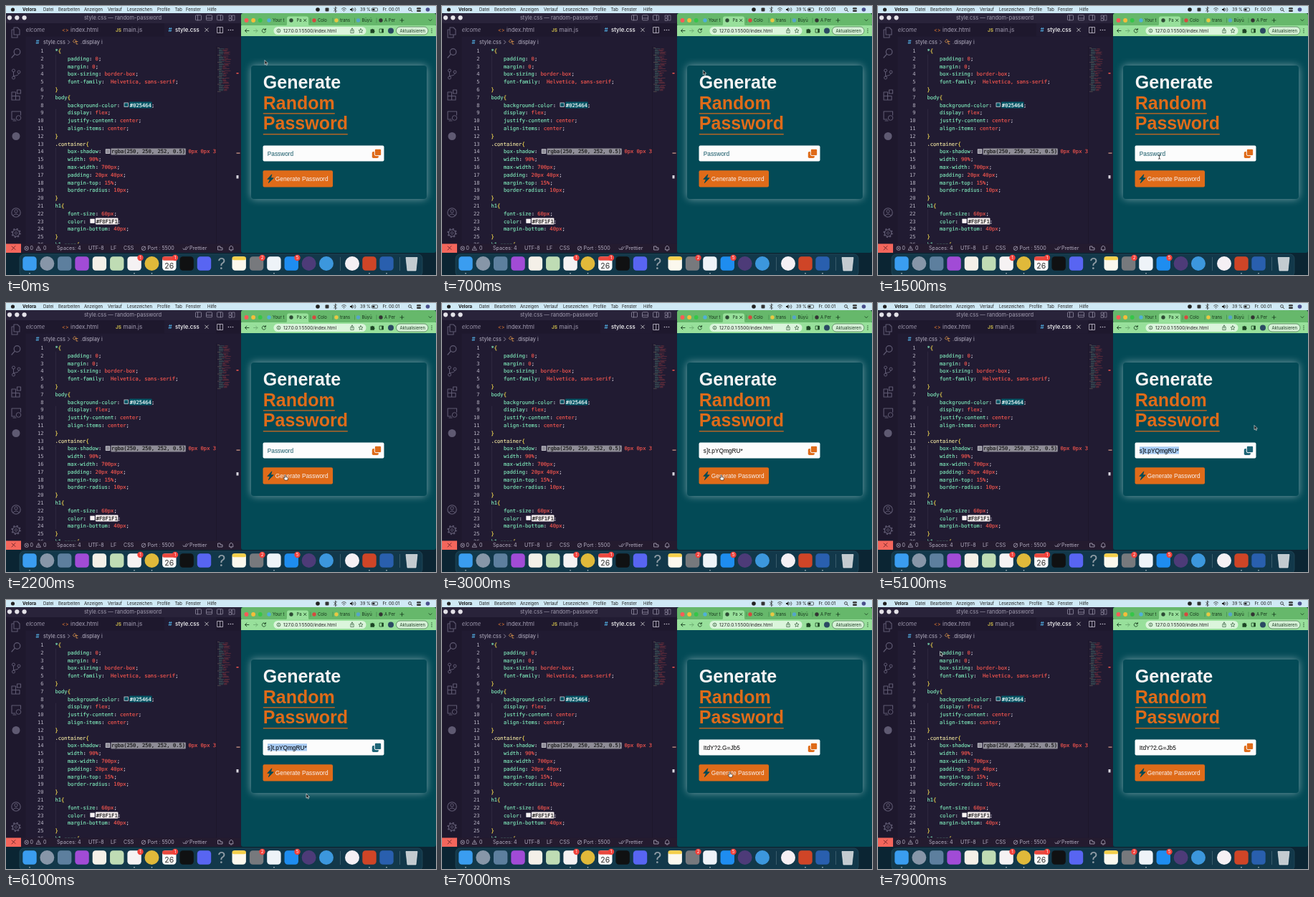
Recreate the animation shown at these times as an HTML page. Size 600 px wide and 375 px high, loop 8000 ms.

```html
<!DOCTYPE html>
<html lang="de">
<head>
<meta charset="utf-8">
<title>Random password</title>
<style>
  html, body { margin: 0; width: 100%; height: 100%; overflow: hidden; background: #0b2533; }
  svg { display: block; width: 100vw; height: 100vh; }
  text { white-space: pre; font-family: Inter, sans-serif; }
  .mono { font-family: "DejaVu Sans Mono", monospace; }
  .page { font-family: "Liberation Sans", sans-serif; }
</style>
</head>
<body>
<svg id="stage" viewBox="0 0 600 375">
  <defs>
    <filter id="glow" x="-20%" y="-20%" width="140%" height="140%"><feGaussianBlur stdDeviation="5.5"/></filter>
    <clipPath id="editorClip"><rect x="27" y="56" width="266" height="275.5"/></clipPath>
  </defs>
</svg>
<script>
const stage = document.getElementById('stage');
const ORANGE = '#df6b19', TEAL = '#034a56', EDITOR = '#211b32', SIDE = '#1e182d';
const MINT = '#7fe8ba', RED = '#f7574f', CREAM = '#f1e6a2', YELLOW = '#f2d94e', DIM = '#5f5a72';

function add(tag, attrs, parent = stage) {
  const el = document.createElementNS('http://www.w3.org/2000/svg', tag);
  for (const k in attrs) el.setAttribute(k, attrs[k]);
  parent.appendChild(el);
  return el;
}
const rect = (x, y, width, height, fill, rx = 0, extra = {}, parent) =>
  add('rect', { x, y, width, height, fill, rx, ...extra }, parent);
const dot = (cx, cy, r, fill, extra = {}) => add('circle', { cx, cy, r, fill, ...extra });
const ring = (cx, cy, r, stroke, width = 1) => dot(cx, cy, r, 'none', { stroke, 'stroke-width': width });
const line = (d, stroke, width = 1, extra = {}, parent) =>
  add('path', { d, stroke, 'stroke-width': width, fill: 'none', 'stroke-linecap': 'round', 'stroke-linejoin': 'round', ...extra }, parent);
const shape = (d, fill, extra = {}, parent) => add('path', { d, fill, ...extra }, parent);
function text(str, x, y, size, fill, extra = {}, parent) {
  const el = add('text', { x, y, 'font-size': size, fill, ...extra }, parent);
  el.textContent = str;
  return el;
}
const trafficLights = (x, y, step, r, colors) =>
  colors.forEach((c, i) => dot(x + i * step, y, r, c));

function drawMenuBar() {
  rect(0, 0, 600, 10, '#cfe9f5');
  dot(9.5, 5, 2.6, '#222');
  text('Velora', 23, 7, 6.1, '#111', { 'font-weight': 700 });
  [['Datei', 52], ['Bearbeiten', 73], ['Anzeigen', 109], ['Verlauf', 142], ['Lesezeichen', 169],
   ['Profile', 211], ['Tab', 235.5], ['Fenster', 251], ['Hilfe', 281]]
    .forEach(([s, x]) => text(s, x, 7, 5.9, '#1b1b1b'));
  dot(435, 5, 2.8, '#222');
  rect(445.5, 2.5, 5, 5, '#333', 1);
  line('M457.5 3l4 4l-2 2V1l2 2l-4 4', '#222', .7);
  line('M468.5 4q3-3 6 0M469.8 5.7q1.7-1.7 3.4 0M471.5 7.4v.1', '#222', .8);
  shape('M480 4h1.5l2-2v6l-2-2h-1.5z', '#222');
  line('M485 3.5q1.5 1.5 0 3M487 2.5q2.4 2.5 0 5', '#222', .7);
  text('39 %', 494, 7, 5.9, '#1b1b1b');
  rect(510.5, 2.8, 8, 4.4, 'none', 1, { stroke: '#333', 'stroke-width': .7 });
  rect(511.4, 3.7, 3, 2.6, '#222');
  text('Fr. 00:01', 525.5, 7, 5.9, '#1b1b1b');
  ring(563.5, 4.5, 1.9, '#222', .8);
  line('M565 6l1.8 1.8', '#222', .8);
  rect(573, 2.2, 6, 2.4, '#333', 1.2);
  rect(573, 5.5, 6, 2.4, '#333', 1.2);
  dot(588.5, 5, 2.8, '#4a4f8c');
}

function drawActivityBar() {
  rect(0, 24, 27.5, 308, SIDE);
  line('M11 30h5l3 3v7h-8zM11 33h-3v11h8v-4', DIM, 1.1);
  ring(15.5, 64, 4.3, DIM, 1.2);
  line('M12.3 67.2l-4.3 4.8', DIM, 1.2);
  [[10.5, 90], [10.5, 100], [18, 92]].forEach(([x, y]) => ring(x, y, 2, DIM));
  line('M10.5 92v6M18 94q0 3-7 3.5', DIM);
  line('M8 120h5.5v11H8zM8 125.5h11v5.5h-5.5M15.5 117h5v5h-5z', DIM, 1.1);
  line('M13 158H8v-11h12.5v5M10 160h4', DIM, 1.1);
  ring(17.5, 156, 3.3, DIM);
  dot(14, 181.5, 5.5, DIM);
  ring(14, 288, 6.2, DIM, 1.1);
  ring(14, 286, 2.2, DIM);
  line('M9.8 292.3q4.2-5 8.4 0', DIM);
  ring(14, 316.5, 4.6, DIM, 1.2);
  ring(14, 316.5, 1.7, DIM);
  dot(14, 316.5, 5.9, 'none', { stroke: DIM, 'stroke-width': 1.6, 'stroke-dasharray': '2.1 2.53' });
}

function drawEditorChrome() {
  rect(0, 10, 328, 334, EDITOR, 3);
  rect(0, 10, 328, 14, '#29233a', 3);
  trafficLights(5, 16.3, 10.3, 3.1, ['#e4e2e8', '#e4e2e8', '#e4e2e8']);
  text('style.css — random-password', 163, 19, 7.5, '#a29db0', { 'text-anchor': 'middle' });
  const icon = '#8f899f';
  [264.5, 279.5, 294.5].forEach((x, i) => {
    rect(x, 12.8, 8, 7, 'none', .8, { stroke: icon, 'stroke-width': .8 });
    line([`M${x + 3} 13v7`, `M${x} 17h8`, `M${x + 5} 13v7`][i], icon, .8);
  });
  line('M311.5 13h3v3h-3zM311.5 17.5h3v3h-3zM316 13h3v7h-3z', icon, .7);

  rect(27.5, 24, 300.5, 18.5, SIDE);
  rect(221, 24, 72, 18.5, EDITOR);
  const tabY = 36.2;
  text('elcome', 27.8, tabY, 7.7, '#9b95aa', { 'font-style': 'italic' });
  text('<>', 78, tabY, 7.2, '#e37933');
  text('index.html', 90, tabY, 8, '#a49eb3');
  text('JS', 153, tabY - .2, 6.4, '#d3c04b', { 'font-weight': 700 });
  text('main.js', 163.5, tabY, 8, '#a49eb3');
  text('#', 226.5, tabY, 8, '#4d9fd0', { 'font-weight': 700 });
  text('style.css', 236, tabY, 7.9, '#fff', { 'font-weight': 500 });
  line('M277.7 31l4.6 4.6M282.3 31l-4.6 4.6', '#ddd', .8);
  line('M295 29.5h7.5v8H295zM298.7 29.5v8', '#c9c4d2', .8);
  [310.5, 313.5, 316.5].forEach(x => dot(x, 33.5, .8, '#c9c4d2'));

  text('#', 41.5, 53, 7.7, '#4d9fd0', { 'font-weight': 700 });
  text('style.css', 52, 53, 7.4, '#b9b4c6');
  line('M86.5 48l2.3 2.4l-2.3 2.4', '#aaa4b8', .8);
  line('M93.5 49l2.5-2.5l2 2l-2.5 2.5zM97 49.5h3M98 49.5v3.5h2', '#e39a4c', .8);
  text('.display i', 104, 53, 7.4, '#b9b4c6');
}

const SOURCE = [
  '*{', 'padding: 0;', 'margin: 0;', 'box-sizing: border-box;', 'font-family:  Helvetica, sans-serif;', '}',
  'body{', 'background-color: ~#025464~;', 'display: flex;', 'justify-content: center;', 'align-items: center;', '}',
  '.container{', 'box-shadow: ~rgba(250, 250, 252, 0.5)~ 0px 0px 3', 'width: 90%;', 'max-width: 700px;',
  'padding: 20px 40px;', 'margin-top: 15%;', 'border-radius: 10px;', '}',
  'h1{', 'font-size: 60px;', 'color: ~#F8F1F1~;', 'margin-bottom: 40px;', '}', 'h1 span{'
];
const SWATCH = { '#025464': ['#025464', '#fff'], '#F8F1F1': ['#f8f1f1', '#111'] };

function drawCode() {
  const size = 7.13, cw = size * .602, code = add('g', { clipPath: '', 'clip-path': 'url(#editorClip)' });
  const put = (s, x, y, fill) =>
    text(s, x, y, size, fill, { class: 'mono', stroke: fill, 'stroke-width': .15 }, code);
  line('M69.5 68v42M69.5 144v42M69.5 198v75M69.5 284v31', '#3d364d', .5, {}, code);
  SOURCE.forEach((src, i) => {
    const y = 65 + i * 10.8;
    text(i + 1, 52.5, y, size, '#b9b5c4', { class: 'mono', 'text-anchor': 'end' }, code);
    const cut = src.indexOf(':');
    if (cut < 0) {
      const name = src.replace(/[{}]/, '');
      put(name, 68.5, y, name[0] === '.' ? CREAM : MINT);
      put(src.slice(name.length), 68.5 + name.length * cw, y, YELLOW);
      return;
    }
    put(src.slice(0, cut), 86, y, MINT);
    put(':', 86 + cut * cw, y, '#d8d3e0');
    let x = 86 + (cut + 1) * cw;
    src.slice(cut + 1).split('~').forEach((part, k) => {
      if (k === 1) {
        const [bg, ink] = SWATCH[part] || ['#8e8c96', '#111'];
        rect(x + 1.7, y - 5.6, 5.6, 5.6, bg, 0, { stroke: '#e8e8ee', 'stroke-width': .7 }, code);
        x += 9.6;
        rect(x - .7, y - 7, part.length * cw + 1.4, 9, bg, 1, {}, code);
        put(part, x, y, ink);
      } else {
        const body = part.replace(/;$/, '');
        put(body, x, y, RED);
        if (body !== part) put(';', x + body.length * cw, y, '#d8d3e0');
      }
      x += part.length * cw;
    });
  });
}

function drawMinimap() {
  rect(293, 56, .6, 275.5, '#1b1627');
  let seed = 7;
  const rnd = () => (seed = seed * 16807 % 2147483647) / 2147483647;
  for (let i = 0; i < 43; i++) {
    const y = 58 + i * 1.45, head = i % 7 === 0, x = head ? 295 : 297, w = 3 + rnd() * 5;
    rect(x, y, w, .7, head ? CREAM : MINT, 0, { opacity: .3 });
    if (!head) rect(x + w + .8, y, 2 + rnd() * 8, .7, RED, 0, { opacity: .38 });
  }
  rect(321.5, 93, 3, 1.5, RED);
  rect(321.5, 204.5, 5, 1.2, '#d9a08a');
  rect(321.5, 236, 3, 4.5, '#d8d5de');
}

function drawStatusBar() {
  rect(0, 331.5, 328, 12.5, '#241b2f');
  rect(0, 331.5, 21, 12.5, '#f4665c');
  line('M8 335l2.5 2.5l-2.5 2.5M13 334.5l-2.5 2.5l2.5 2.5', '#5a1f26', .8);
  const ink = '#b3adc0', label = (s, x) => text(s, x, 340.4, 7.1, ink);
  ring(28.7, 337.8, 2.8, ink, .7);
  line('M27.5 336.6l2.4 2.4M29.9 336.6l-2.4 2.4M45.5 335l3 5.3h-6zM45.5 337v1.5', ink, .7);
  [['0', 33.5], ['0', 52], ['Spaces: 4', 71], ['UTF-8', 115], ['LF', 146], ['CSS', 164],
   ['Port : 5500', 197.5], ['Prettier', 256]].forEach(a => label(...a));
  ring(192, 337.8, 2.8, ink, .7);
  line('M190 339.8l4-4M247 338l1.5 2l3.5-4.5M250.5 339.3l.6.7l3.4-4.5', ink, .8);
  line('M296 335h3v2h3v3h-6zM311.5 339.5q0-5 2.7-5t2.7 5zM313.5 341h1.4', ink, .8);
}

function drawBrowser() {
  const strip = '#66b86b', bar = '#98e09b';
  rect(328, 12, 272, 332, TEAL, 3);
  rect(328, 10, 272, 18, strip, 3);
  rect(328, 27, 272, 15, bar);
  trafficLights(335.5, 20, 9.6, 2.9, ['#fc5b57', '#f5bd3a', '#35c648']);
  shape('M390 27.5q2 0 2-3v-7q0-3 3-3h24q3 0 3 3v7q0 3 2 3z', bar);
  [['Your t', 364.5, '#4fb0d8'], ['Pa', 395.5, '#2d4a35'], ['Colo', 427.5, '#d6493f'], ['trans', 458.5, '#e9c843'],
   ['Büyü', 489, '#56a5c9'], ['A Per', 520.5, '#333']].forEach(([s, x, fill], i) => {
    dot(x + 2.5, 20, 2.7, fill);
    text(s, x + (i === 1 ? 10 : 7.5), 22.2, 5.9, '#15331b');
  });
  [425, 456, 486.5, 517].forEach(x => line(`M${x} 17v6`, '#3b8546', .6));
  line('M415.5 18.2l3.4 3.4M418.9 18.2l-3.4 3.4M550 20h5M552.5 17.5v5M590 18.8l2 2l2-2', '#153a1c', .8);

  const ink = '#1d4525';
  line('M339 34.5h-5.5m2.4-2.4l-2.4 2.4l2.4 2.4', ink, .9);
  line('M345.5 34.5h5.5m-2.4-2.4l2.4 2.4l-2.4 2.4', '#6bab70', .9);
  line('M362 33a2.6 2.6 0 1 0 .3 2.5M362.4 31.4v2h-2', ink, .9);
  rect(373.5, 29, 129, 11, '#dbf5dc', 5.5);
  ring(380.5, 34.5, 2.4, ink, .7);
  line('M380.5 34.3v1.3M380.5 33.2v.05', ink, .6);
  text('127.0.0.1:5500/index.html', 387, 37, 6.3, '#222');
  line('M482 33.5h-1.2v4h4.4v-4H484M483 35.5v-4.5m-1.3 1.2l1.3-1.2l1.3 1.2', ink, .6);
  line('M495 31.6l.9 2l2.1.2l-1.6 1.4l.5 2.1l-1.9-1.1l-1.9 1.1l.5-2.1l-1.6-1.4l2.1-.2z', ink, .6);
  shape('M508.5 32.5h1.6a1.2 1.2 0 0 1 2.2 0h1.6v1.7a1.2 1.2 0 0 1 0 2.2v1.4h-5.4z', ink);
  line('M521.5 32h5v5h-5z', ink, .8);
  rect(524.2, 32, 2.3, 5, ink);
  dot(537, 34.5, 4, '#2b4a63');
  rect(544.5, 29, 44.5, 11, '#d6f1d7', 5.5, { stroke: '#2c5a35', 'stroke-width': .6 });
  text('Aktualisieren', 549.5, 36.7, 5.8, '#1c3a22');
  [32, 34.5, 37].forEach(y => dot(594, y, .65, ink));
}

function drawPage() {
  rect(342, 83, 245, 186, '#fafafc', 5, { opacity: .48, filter: 'url(#glow)' });
  rect(342, 83, 245, 186, TEAL, 4);
  const title = (s, y, fill) => text(s, 358.8, y, 25, fill, { class: 'page', 'font-weight': 700 });
  title('Generate', 114.7, '#f8f4f4');
  title('Random', 143.6, ORANGE);
  title('Password', 172.2, ORANGE);
  rect(358.8, 149.3, 100, 1.2, ORANGE);
  rect(358.8, 178.2, 118, 1.2, ORANGE);
  rect(358.5, 194.5, 169, 22, '#fcfcfc', 2);
  rect(358.5, 229.3, 97.5, 23.2, ORANGE, 2);
  shape('M370.8 234.8l-6 6.6h3.6l-2.1 5.4l7-7h-3.7z', TEAL, { stroke: TEAL, 'stroke-width': .8, 'stroke-linejoin': 'round' });
  text('Generate Password', 375.8, 243.9, 8.35, '#f8f1f1', { class: 'page' });
}

function drawDock() {
  const tile = (x, fill) => rect(x - 9.7, 349.3, 19.4, 19.4, fill, 4.5);
  const disc = (x, fill) => dot(x, 359, 10, fill);
  const at = i => 33 + i * 24.35;
  rect(19, 346, 562, 31, '#12384a', 6, { stroke: '#2b5264', 'stroke-width': .6 });
  ['#3a9df0', '', '#5d7f9e', '#a14bd6', '#f4f0e8', '#bfdcb4', '#f5f2f3', '', '#fafafa', '#101112',
   '#5865f2', '', '#fbf8ee', '#77797d', '#eef3f8', '#1e8df0']
    .forEach((fill, i) => fill && tile(at(i), fill));
  [[1, '#8796a8'], [7, '#e0b93a'], [16, '#4d3b78'], [17, '#3c97dd']].forEach(([i, fill]) => disc(at(i), fill));
  rect(315.5, 349.3, 19.4, 5, '#f5cf4a', 2.5);
  text('?', at(11), 367, 22, '#8f9ca5', { 'text-anchor': 'middle' });
  rect(218.1, 349.3, 19.4, 5.5, '#e9483e', 2.5);
  text('26', 227.8, 365.5, 10.5, '#333', { 'text-anchor': 'middle' });
  [[187.5, '1'], [236, '1'], [357.5, '2'], [406.5, '5']].forEach(([x, n]) => {
    dot(x, 351, 4.2, '#f0403a');
    text(n, x, 353.2, 6, '#fff', { 'text-anchor': 'middle' });
  });
  [466, 549].forEach(x => rect(x, 350, .7, 19, '#4a6a7a'));
  disc(483, '#f5f0f4');
  tile(507, '#cf4527');
  tile(531, '#295fae');
  shape('M558 350.5h16l-2 18.5h-12z', '#c3cbd0', { stroke: '#e6eaed', 'stroke-width': .7 });
  [33, 179, 203.5, 374, 507, 531].forEach(x => dot(x, 372.8, .8, '#cfd8dd'));
}

drawMenuBar();
drawEditorChrome();
drawActivityBar();
drawCode();
drawMinimap();
drawStatusBar();
drawBrowser();
drawPage();
drawDock();

const selection = rect(365, 200.3, 55, 10.2, '#a8caf2');
const field = text('', 364.8, 208.6, 8.3, '#000', { class: 'page' });
const copyIcon = add('g', {});
rect(510.8, 203, 9, 9, 'currentColor', 1.8, {}, copyIcon);
rect(514.3, 199.2, 9.4, 9.4, 'currentColor', 1.8, { stroke: '#fcfcfc', 'stroke-width': 1 }, copyIcon);

const pointers = { arrow: add('g', {}), beam: add('g', {}), hand: add('g', {}) };
const outline = { stroke: '#fff', 'stroke-width': .6, 'stroke-linejoin': 'round' };
shape('M0 0v6.2l1.4-1.3l1 2.3l1.1-.5l-1-2.2h1.9z', '#111', outline, pointers.arrow);
line('M-1.2-2.8q1.2 0 1.2.8v4q0 .8-1.2.8M1.2-2.8q-1.2 0-1.2.8M0 2q0 .8 1.2.8', '#111', .7, {}, pointers.beam);
shape('M-1-3q.8-.8 1.3 0v2.6l2.4.5q.8.3.7 1.2l-.5 2.7h-3.7l-2-2.8q0-.9.9-.7l.9.8z', '#fff',
  { stroke: '#111', 'stroke-width': .6 }, pointers.hand);

// Pointer stops: time, x, y
const PATH = [
  [0, 361, 75.5], [500, 361, 75.5], [1500, 392.5, 210.5], [2200, 390, 243], [3200, 390, 243],
  [3900, 502, 209], [4200, 517, 205.5], [4600, 517, 205.5], [5100, 525, 170.5],
  [6100, 419, 270], [6500, 402, 243], [7000, 402, 243], [7900, 86.5, 71.5]
];
const LOOP = 8000, CLICK_1 = 2400, COPY = 4400, CLICK_2 = 6700;

function pointerAt(t) {
  const i = PATH.findIndex(p => p[0] > t);
  if (i < 0) return PATH[PATH.length - 1].slice(1);
  const [t0, x0, y0] = PATH[i - 1], [t1, x1, y1] = PATH[i];
  const u = (t - t0) / (t1 - t0), e = u * u * (3 - 2 * u);
  return [x0 + (x1 - x0) * e, y0 + (y1 - y0) * e];
}
const inside = (x, y, l, t, r, b) => x >= l && x <= r && y >= t && y <= b;

function render(t) {
  const copied = t >= COPY && t < CLICK_2;
  field.textContent = t < CLICK_1 ? 'Password' : t < CLICK_2 ? 's}t.pYQmgRU*' : 'ItdY?2.G=Jb5';
  field.setAttribute('fill', t < CLICK_1 ? '#125666' : '#000');
  selection.setAttribute('visibility', copied ? 'visible' : 'hidden');
  copyIcon.setAttribute('color', copied ? '#1d6476' : ORANGE);
  const [x, y] = pointerAt(t);
  const kind = inside(x, y, 358, 229, 456, 253) || inside(x, y, 511, 199, 524, 212) ? 'hand'
    : inside(x, y, 358, 194, 528, 217) ? 'beam' : 'arrow';
  for (const name in pointers) {
    pointers[name].setAttribute('visibility', name === kind ? 'visible' : 'hidden');
    pointers[name].setAttribute('transform', `translate(${x} ${y})`);
  }
}

const start = performance.now();
function tick() {
  const t = (performance.now() - start) % LOOP;
  render(Math.floor(t / 100) * 100);
  requestAnimationFrame(tick);
}
tick();
</script>
</body>
</html>
```
